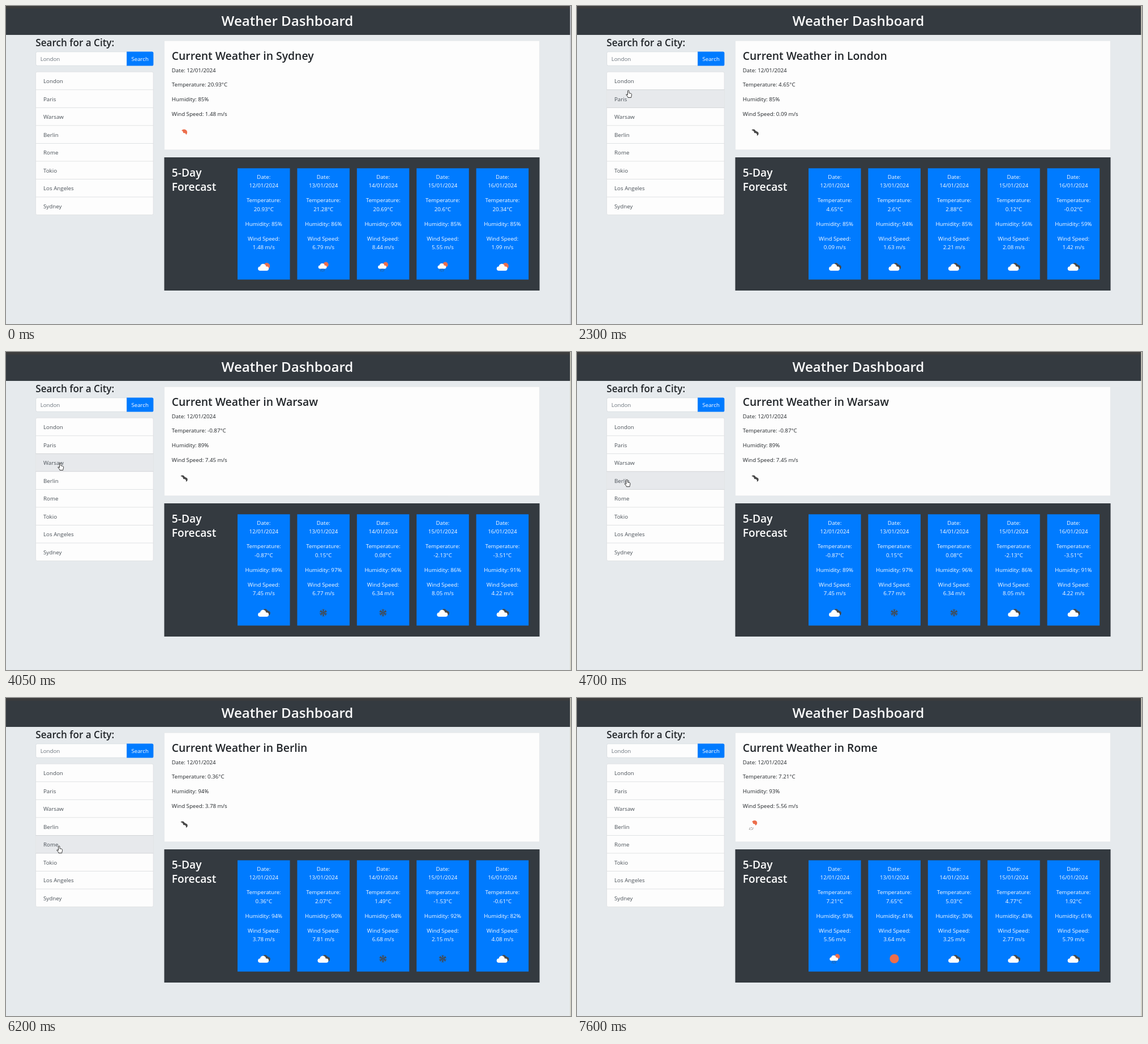
An HTML page with a canvas that plays this animation: 998 px wide and 561 px high, repeating every 8000 ms.

```html
<!DOCTYPE html>
<html lang="en">
<head>
<meta charset="utf-8">
<title>Weather Dashboard</title>
<style>
  html, body { margin: 0; width: 100%; height: 100%; overflow: hidden; background: #e6eaed; }
  canvas { display: block; width: 998px; height: 561px; }
</style>
</head>
<body>
<canvas id="stage"></canvas>
<script>
const W = 998, H = 561, LOOP = 8000, STEP = 50;
const canvas = document.getElementById('stage');
const ctx = canvas.getContext('2d');
const dpr = window.devicePixelRatio || 1;
canvas.width = W * dpr;
canvas.height = H * dpr;

const FONT = '"Open Sans", "Noto Sans", sans-serif';
const WHITE = '#fdfdfd', DARK = '#343a40', BLUE = '#007bff', INK = '#212529';
const SUN = '#ec6e4c', GREY = '#484848';

const rows = ['London', 'Paris', 'Warsaw', 'Berlin', 'Rome', 'Tokio', 'Los Angeles', 'Sydney'];
const LIST = { x: 52.5, y: 116.2, w: 207.7, h: 31.53 };

// Per day: temperature, humidity, wind speed, sky
const forecasts = {
  Sydney: '20.93 85 1.48 few|21.28 86 6.79 rain|20.69 90 8.44 rain|20.6 85 5.55 rain|20.34 85 1.99 few',
  London: '4.65 85 0.09 broken|2.6 94 1.63 broken|2.88 85 2.21 broken|0.12 56 2.08 broken|-0.02 59 1.42 broken',
  Paris: '1.32 84 2.37 broken|0.95 88 2.14 broken|1.76 86 3.02 broken|2.41 73 3.45 broken|-0.38 70 2.26 broken',
  Warsaw: '-0.87 89 7.45 broken|0.15 97 6.77 snow|0.08 96 6.34 snow|-2.13 86 8.05 broken|-3.51 91 4.22 broken',
  Berlin: '0.36 94 3.78 broken|2.07 90 7.81 broken|1.49 94 6.68 snow|-1.53 92 2.15 snow|-0.61 82 4.08 broken',
  Rome: '7.21 93 5.56 rain|7.65 41 3.64 clear|5.03 30 3.25 broken|4.77 43 2.77 broken|1.92 61 5.79 broken'
};

// Each click outlines a row, then its data arrives
const clicks = [
  { row: 0, press: 1300, done: 1400 },
  { row: 1, press: 2750, done: 2900 },
  { row: 2, press: 3950, done: 4050 },
  { row: 3, press: 5250, done: 5450 },
  { row: 4, press: 6650, done: 6800 }
];

// Pointer path: time, x, y
const path = [
  [150, 11, 215], [800, 85, 134], [950, 85, 135], [1750, 85, 135], [2300, 91, 149],
  [2600, 88, 164], [3100, 88, 164], [3700, 96, 196], [4400, 96, 196], [4800, 87, 230.5],
  [5600, 87, 230.5], [6200, 94, 261], [6850, 94, 261], [7400, 123, 105], [LOOP, 123, 105]
];

const handShape = new Path2D('M-1.5 1Q-1.5 0-.3 0Q.9 0 .9 1V4.6L4.6 5.4Q5.8 5.8 5.6 7.5L5 10.5L4.6 12.5H-1L-1.4 11L-4 8Q-4.6 6.7-3.2 6.8L-1.5 8Z');
const arrowShape = new Path2D('M0 0V11L2.5 8.8L4.2 12.5L5.8 11.8L4.2 8.2H7.3Z');

function text(str, x, y, size, color, weight = 400, align = 'left') {
  ctx.font = `${weight} ${size}px ${FONT}`;
  ctx.fillStyle = color;
  ctx.textAlign = align;
  ctx.fillText(str, x, y);
}

function rect(x, y, w, h, fill) {
  ctx.fillStyle = fill;
  ctx.fillRect(x, y, w, h);
}

function rounded(x, y, w, h, radii, fill, stroke, line = 0.7) {
  ctx.beginPath();
  ctx.roundRect(x, y, w, h, radii);
  if (fill) { ctx.fillStyle = fill; ctx.fill(); }
  if (stroke) { ctx.strokeStyle = stroke; ctx.lineWidth = line; ctx.stroke(); }
}

function disc(x, y, r, fill) {
  ctx.fillStyle = fill;
  ctx.beginPath();
  ctx.arc(x, y, r, 0, Math.PI * 2);
  ctx.fill();
}

function cloud() {
  disc(-1, 0, 5.2, WHITE);
  disc(-6.2, 3.2, 3.8, WHITE);
  disc(5.3, 3.3, 3.7, WHITE);
  rect(-6.2, 1.5, 11.5, 5.5, WHITE);
}

const icons = {
  clear() { disc(0, 0, 8.1, SUN); },
  few() {
    disc(5.5, -1.3, 5.6, SUN);
    cloud();
  },
  broken() {
    disc(2.6, -3.2, 3.6, GREY);
    disc(8, 0.8, 3.7, GREY);
    disc(5.4, -1, 3.4, GREY);
    cloud();
  },
  rain() {
    disc(4.6, -3.8, 4.6, SUN);
    ctx.save();
    ctx.translate(-1, -2);
    ctx.scale(0.78, 0.78);
    cloud();
    ctx.restore();
    for (let i = 0; i < 6; i++) {
      disc(-3.4 + (i % 3) * 2.7 - (i > 2 ? 1 : 0), 5 + (i > 2 ? 2.8 : 0) - (i % 2) * 0.6, 0.65, GREY);
    }
  },
  snow() {
    ctx.strokeStyle = GREY;
    ctx.lineWidth = 1;
    for (let i = 0; i < 6; i++) {
      ctx.save();
      ctx.rotate(i * Math.PI / 3);
      ctx.beginPath();
      ctx.moveTo(0, 0);
      ctx.lineTo(0, -6.6);
      ctx.moveTo(-2.1, -6);
      ctx.lineTo(0, -4);
      ctx.lineTo(2.1, -6);
      ctx.moveTo(-1.7, -3);
      ctx.lineTo(1.7, -3);
      ctx.stroke();
      ctx.restore();
    }
  }
};

function icon(name, x, y) {
  ctx.save();
  ctx.translate(x, y);
  icons[name]();
  ctx.restore();
}

function pointerAt(t) {
  if (t < 200 || t >= 7600) return null;
  let i = 1;
  while (t > path[i][0]) i++;
  const [t0, x0, y0] = path[i - 1], [t1, x1, y1] = path[i];
  const k = (t - t0) / (t1 - t0), e = k * k * (3 - 2 * k);
  const x = x0 + (x1 - x0) * e, y = y0 + (y1 - y0) * e;
  const row = Math.floor((y - LIST.y) / LIST.h);
  const over = x > LIST.x && x < LIST.x + LIST.w && row >= 0 && row < rows.length;
  const alpha = t < 7500 ? 1 : (7600 - t) / 150;
  return { x, y, alpha, row: over ? row : -1 };
}

function drawHeader(t) {
  rect(0, 0, W, H, '#e6eaed');
  rect(0, 0, W, 51, DARK);
  rect(0, 0, W, 4.5, '#3d3d3d');
  rect(996.3, 0, 1.7, H, t < 200 ? '#c6c8ce' : '#d2d0c4');
  text('Weather Dashboard', 497, 35, 24.1, WHITE, 600, 'center');
}

function drawSearch() {
  text('Search for a City:', 52.3, 71.3, 17.1, INK, 600);
  rounded(52.7, 80.8, 161, 24.4, [2.6, 0, 0, 2.6], WHITE, '#ced4da');
  text('London', 60.7, 97.1, 9.7, '#6c757d');
  rounded(213.2, 80.5, 47.2, 25, [0, 2.6, 2.6, 0], BLUE);
  text('Search', 236.7, 97.1, 9.7, WHITE, 400, 'center');
}

function drawList(hover, pressed) {
  const { x, y, w, h } = LIST;
  rounded(x, y, w, h * rows.length, 2.6, WHITE, '#d9dcde');
  if (hover >= 0) rect(x, y + hover * h, w, h, '#e7e9ec');
  rows.forEach((name, i) => {
    const top = y + i * h;
    const edge = hover >= 0 && (i === hover || i === hover + 1);
    if (i) rect(x, top - 0.35, w, 0.8, edge ? '#cbced1' : '#d9dcde');
    text(name, 66, top + 20, 9.75, '#495057');
  });
  if (pressed >= 0) {
    rounded(x + 0.4, y + pressed * h + 0.2, w - 0.6, h - 0.2, 2.4, null, '#101010', 1.4);
  }
}

function drawCurrent(city, day) {
  const [temp, hum, wind, sky] = day;
  rounded(279.6, 61.2, 662.8, 192.6, 0, WHITE, '#e0e3e6', 0.6);
  text('Current Weather in ' + city, 292.8, 95, 19.35, INK, 600);
  ['Date: 12/01/2024', `Temperature: ${temp}°C`, `Humidity: ${hum}%`, `Wind Speed: ${wind} m/s`]
    .forEach((line, i) => text(line, 292.8, 116.5 + i * 25.95, 9.7, INK));
  icon(sky, 309, 224.3);
}

function drawForecast(days) {
  rect(279.5, 267, 663, 235, DARK);
  text('5-Day', 292.8, 301, 19.2, WHITE, 600);
  text('Forecast', 292.8, 325.8, 19.2, WHITE, 600);
  days.forEach(([temp, hum, wind, sky], i) => {
    const x = 409 + i * 105.4, mid = x + 46.3;
    rect(x, 286.3, 92.5, 196.3, BLUE);
    const lines = [
      ['Date:', 304.9], [`${12 + i}/01/2024`, 320.4],
      ['Temperature:', 346.4], [`${temp}°C`, 361.9],
      [`Humidity: ${hum}%`, 387.9],
      ['Wind Speed:', 413.9], [`${wind} m/s`, 429.4]
    ];
    for (const [line, y] of lines) text(line, mid, y, 9.7, WHITE, 400, 'center');
    icon(sky, mid - 0.2, 460);
  });
}

function drawPointer(p) {
  const shape = p.row >= 0 ? handShape : arrowShape;
  ctx.save();
  ctx.globalAlpha = p.alpha;
  ctx.translate(p.x, p.y);
  ctx.lineJoin = 'round';
  ctx.lineWidth = 0.9;
  ctx.fillStyle = '#fff';
  ctx.strokeStyle = '#222';
  ctx.fill(shape);
  ctx.stroke(shape);
  ctx.restore();
}

function draw(t) {
  const pointer = pointerAt(t);
  const active = clicks.find(c => t >= c.press && t < c.done);
  const loaded = clicks.filter(c => t >= c.done).pop();
  const city = loaded ? rows[loaded.row] : 'Sydney';
  const days = forecasts[city].split('|').map(day => day.split(' '));

  ctx.setTransform(dpr, 0, 0, dpr, 0, 0);
  drawHeader(t);
  drawSearch();
  drawList(pointer ? pointer.row : -1, active ? active.row : -1);
  drawCurrent(city, days[0]);
  drawForecast(days);
  if (pointer) drawPointer(pointer);
}

function tick() {
  const t = performance.now() % LOOP;
  draw(Math.floor(t / STEP) * STEP);
  requestAnimationFrame(tick);
}
tick();
</script>
</body>
</html>
```
